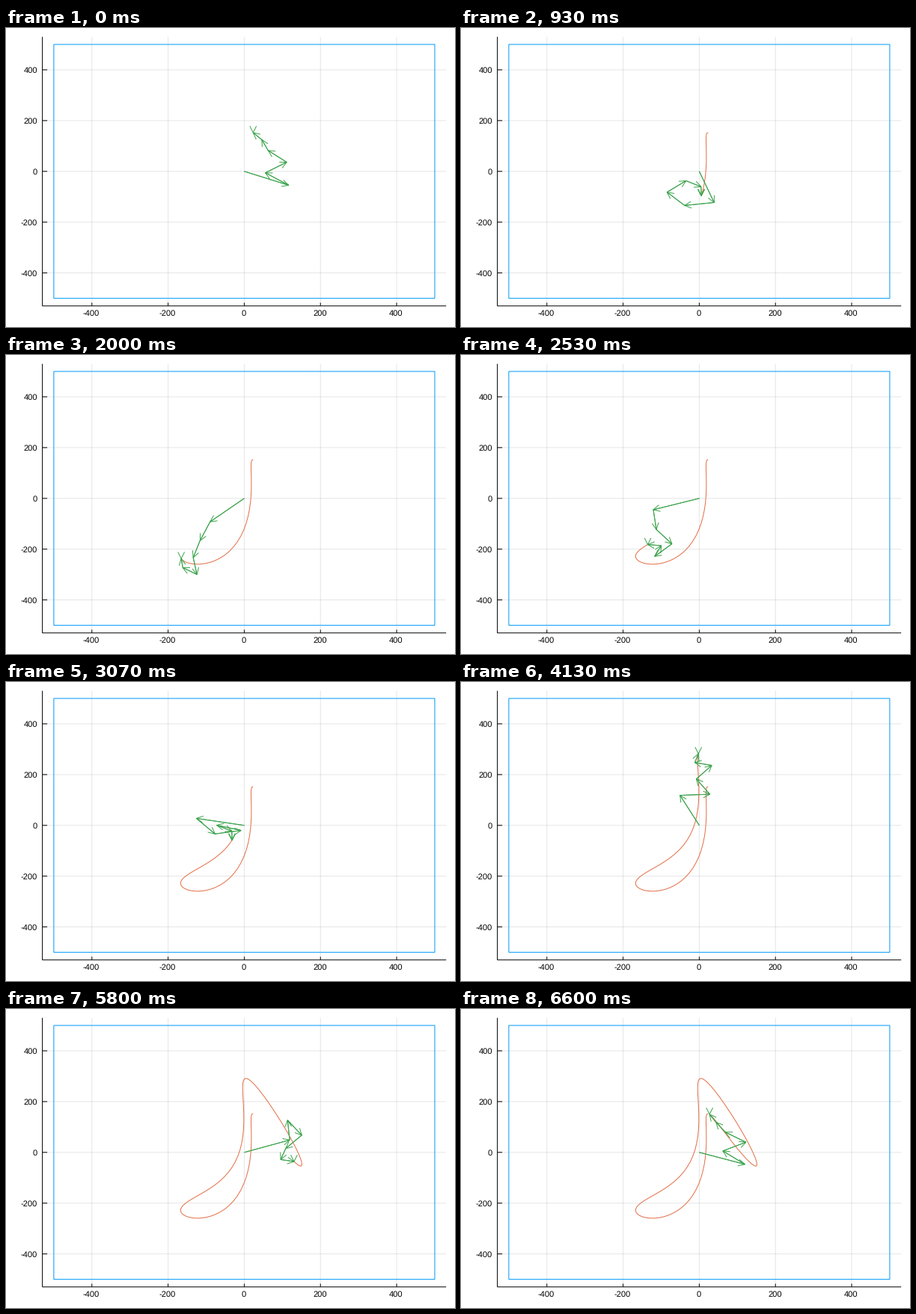
Animation, 600 px wide and 400 px high, one loop 6.67 s. Source, as a matplotlib script:

```python
import numpy as np
import matplotlib as mpl
import matplotlib.pyplot as plt
from matplotlib.animation import FuncAnimation

mpl.rcParams["font.family"] = "Liberation Sans"
mpl.rcParams["text.hinting"] = "none"
mpl.rcParams["path.simplify"] = False

W, H, DPI = 600, 400, 100
FRAMES = 100
PX = 72 / DPI
BLUE, ORANGE, GREEN = "#009AFA", "#E36F47", "#3DA44E"

LEFT, RIGHT, TOP, BOTTOM = 48.6, 588.2, 11.8, 371.8
LIMIT = 530
X0, Y0 = (LEFT + RIGHT) / 2, (TOP + BOTTOM) / 2
SX, SY = (RIGHT - LEFT) / (2 * LIMIT), (BOTTOM - TOP) / (2 * LIMIT)

# rotating vectors: turns per loop, length, starting angle in degrees
FREQ = np.array([-1, 1, 2, -2, -3, 3])
SIZE = np.array([128.7, 78.3, 69.8, 67.0, 45.8, 35.9])
PHASE = np.radians([-25.1, 141.3, 36.8, 136.6, 111.3, 129.4])

HEAD_LENGTH, HEAD_WIDTH = 8.8, 4.4


def to_px(x, y):
    return X0 + SX * np.asarray(x), Y0 - SY * np.asarray(y)


def chain(t):
    """Joints of the vector chain at loop position t, as an (n, 2) pixel array."""
    z = SIZE * np.exp(1j * (PHASE + 2 * np.pi * FREQ * t))
    joints = np.concatenate([[0], np.cumsum(z)])
    return np.column_stack(to_px(joints.real, joints.imag))


def head(tip, direction):
    d = direction / np.hypot(*direction)
    n = np.array([-d[1], d[0]])
    back = tip - HEAD_LENGTH * d
    return [back + HEAD_WIDTH * n, tip, back - HEAD_WIDTH * n]


def arrows(joints):
    gap = [np.array([np.nan, np.nan])]
    points = []
    for a, b in zip(joints[:-1], joints[1:]):
        points += [a, b] + gap + head(b, b - a) + gap
    # the empty last vector still carries a head, pointing down
    points += head(joints[-1], np.array([0.0, 1.0]))
    return np.array(points)


fig = plt.figure(figsize=(W / DPI, H / DPI), dpi=DPI, facecolor="white")
ax = fig.add_axes([0, 0, 1, 1])
ax.set_xlim(0, W)
ax.set_ylim(H, 0)
ax.axis("off")


def stroke(x, y, color, z=2, **kw):
    line, = ax.plot(x, y, color=color, lw=PX, zorder=z, snap=False,
                    solid_capstyle="butt", solid_joinstyle="miter", **kw)
    return line


def label(x, y, value, align):
    ax.text(x, y, str(value), fontsize=8, ha=align, va="baseline",
            color="black", parse_math=False)


for v in range(-400, 401, 200):
    x, y = to_px(v, v)
    stroke([x, x], [TOP, BOTTOM], "black", 1, alpha=0.1)
    stroke([LEFT, RIGHT], [y, y], "black", 1, alpha=0.1)
    stroke([x, x], [BOTTOM, BOTTOM - 4.3], "black")
    stroke([LEFT, LEFT + 6.5], [y, y], "black")
    label(x - 0.8, 385.2, v, "center")
    label(41.9, y + 4.2, v, "right")

stroke([LEFT, LEFT, RIGHT], [TOP, BOTTOM, BOTTOM], "black")
stroke(*to_px([-500, 500, 500, -500, -500], [-500, -500, 500, 500, -500]), BLUE, 3)

trail = stroke([], [], ORANGE, 4)
links = stroke([], [], GREEN, 5)
pointers = stroke([], [], GREEN, 6)

poses = [chain(i / (FRAMES - 1)) for i in range(FRAMES)]
path = np.array([p[-1] for p in poses])


def draw(i):
    trail.set_data(*path[:i + 1].T)
    links.set_data(*poses[i].T)
    pointers.set_data(*arrows(poses[i]).T)
    return trail, links, pointers


anim = FuncAnimation(fig, draw, frames=FRAMES, interval=66.7,
                     repeat=True, repeat_delay=0)
plt.show()
```
